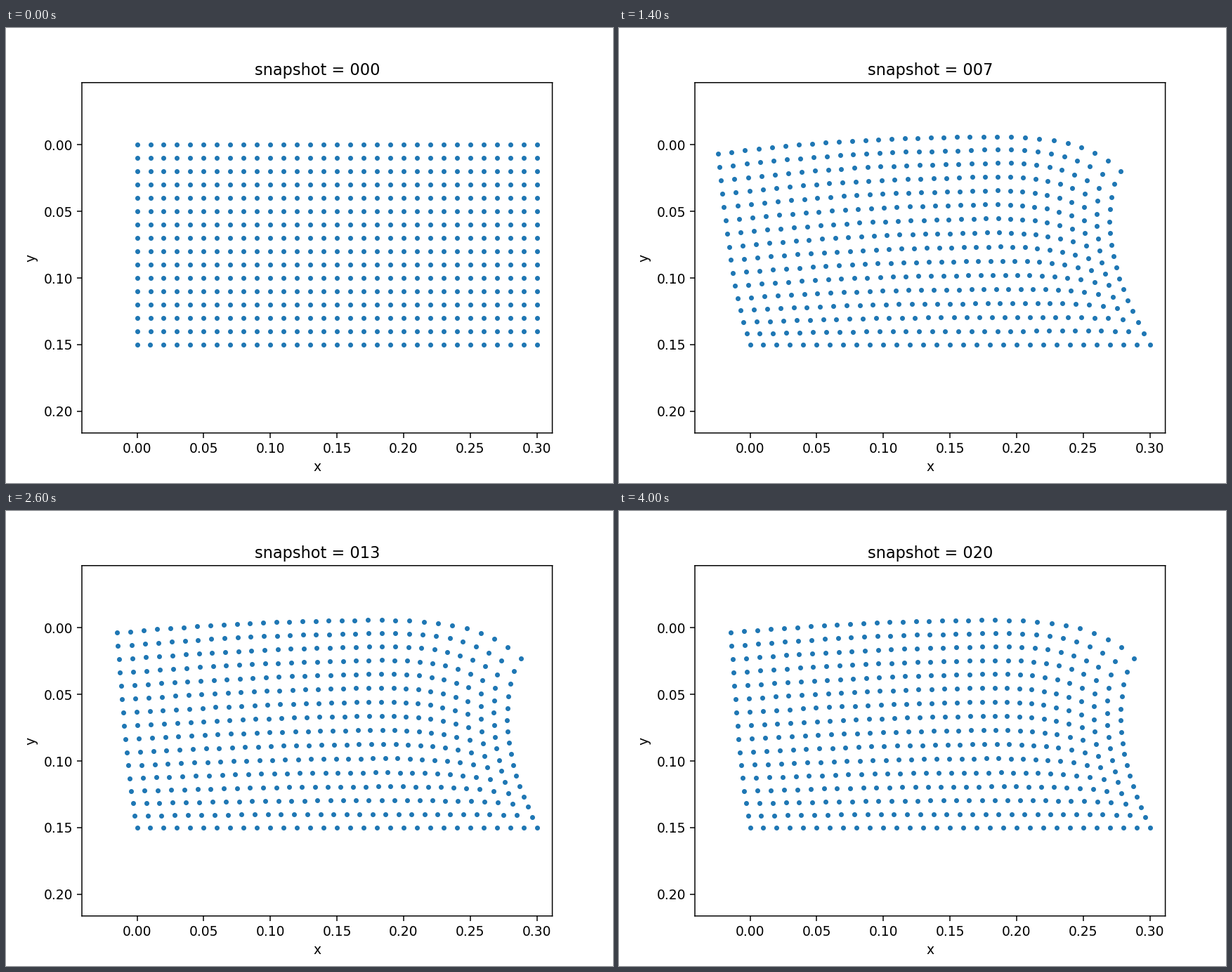
A matplotlib script that plays this animation: 864 by 648 pixels, repeating every 4.2 s.

```python
import itertools
import numpy as np
import matplotlib.pyplot as plt
from matplotlib.animation import FuncAnimation

PX_PER_UNIT = 1897.0
COLS, ROWS = 31, 16
FRAMES, INTERVAL = 21, 200
LAME, SHEAR = 6.0, 1.0  # nearly incompressible block

col, row = np.meshgrid(np.arange(COLS), np.arange(ROWS))
x0, y0 = col * 0.01, row * 0.01


def smoothstep(u):
    u = np.clip(u, 0, 1)
    return u * u * (3 - 2 * u)


def element_stiffness():
    """Stiffness of a unit square bilinear element in plane strain."""
    elastic = np.array([[LAME + 2 * SHEAR, LAME, 0],
                        [LAME, LAME + 2 * SHEAR, 0],
                        [0, 0, SHEAR]])
    stiffness = np.zeros((8, 8))
    gauss = 0.5 + np.array([-0.5, 0.5]) / np.sqrt(3)
    for s, t in itertools.product(gauss, gauss):
        d_ds = np.array([t - 1, 1 - t, t, -t])
        d_dt = np.array([s - 1, -s, s, 1 - s])
        strain = np.zeros((3, 8))
        strain[0, 0::2] = strain[2, 1::2] = d_ds
        strain[1, 1::2] = strain[2, 0::2] = d_dt
        stiffness += strain.T @ elastic @ strain / 4
    return stiffness


def relax_interior(field, edge):
    """Elastic equilibrium of the inner nodes for given edge displacements."""
    total = np.zeros((field.size, field.size))
    local = element_stiffness()
    for j, i in itertools.product(range(ROWS - 1), range(COLS - 1)):
        a = j * COLS + i
        nodes = np.array([a, a + 1, a + COLS + 1, a + COLS])
        dofs = np.column_stack([2 * nodes, 2 * nodes + 1]).ravel()
        total[np.ix_(dofs, dofs)] += local
    values = field.ravel().copy()
    fixed = np.repeat(edge.ravel(), 2)
    inner = ~fixed
    values[inner] = np.linalg.solve(total[np.ix_(inner, inner)],
                                    -total[np.ix_(inner, fixed)] @ values[fixed])
    return values.reshape(field.shape)


def load_mode():
    """Pressed block: the top swells, the right side sinks and caves in."""
    field = np.zeros((ROWS, COLS, 2))
    t, v = np.linspace(0, 1, COLS), np.linspace(0, 1, ROWS)
    field[:, 0] = np.column_stack([np.sin(np.pi * v), -2.4 * (1 - v ** 2)])
    field[:, -1] = np.column_stack([
        7.2 * np.exp(-15 * v) - 19.2 * np.sin(np.pi * v ** 0.8),
        52.6 * (1 - v ** 1.9)])
    field[0] = np.column_stack([
        16.6 * smoothstep((t - 0.6) / 0.4) - 9.5 * t,
        70 * t ** 8.3 - 15 * t - 2.4])
    field[-1] = 0
    edge = (row == 0) | (row == ROWS - 1) | (col == 0) | (col == COLS - 1)
    return relax_interior(field, edge)


def sway_mode():
    """Shear to the left with both ends tilting; the bottom is clamped."""
    c, v = (col - 15) / 15, row / 15
    dx = -(0.9 + 0.03 * c + 0.13 * c ** 2) * (1 - 0.6 * v - 0.4 * v ** 3)
    dy = -0.33 * c * np.abs(c) * (1 - v ** 4)
    return np.dstack([dx, dy])


def load_level(n):
    return 1 - np.exp(-0.8 * n) * np.cos(0.75 * n)


def sway_level(n):
    """Damped swing about 30 px with a soft start."""
    swing = 31.17 * np.exp(-0.064 * n) * np.sin(np.pi / 8 * (n - 4.7))
    return 30 + swing - 3 * np.exp(-((n - 3) / 1.3) ** 2)


REST = np.dstack([x0, y0])
LOADED, SWAYED = load_mode(), sway_mode()


def positions(n):
    shift = load_level(n) * LOADED + sway_level(n) * SWAYED
    return (REST + shift / PX_PER_UNIT).reshape(-1, 2)


plt.rcParams["font.family"] = "DejaVu Sans"
fig, ax = plt.subplots(figsize=(6.4, 4.8), dpi=135)
dots = ax.scatter(x0.ravel(), y0.ravel(), s=5, color="C0", linewidths=1.5)
ax.set_xlim(-0.0414, 0.3116)
ax.set_ylim(0.2163, -0.0467)
ax.set_xticks(np.arange(7) * 0.05)
ax.set_yticks(np.arange(5) * 0.05)
ax.set_xlabel("x")
ax.set_ylabel("y")
title = ax.set_title("snapshot = 000")
for spine in ax.spines.values():
    spine.set_snap(False)


def update(n):
    dots.set_offsets(positions(n))
    title.set_text(f"snapshot = {n:03d}")
    return dots, title


anim = FuncAnimation(fig, update, frames=FRAMES, interval=INTERVAL, repeat=True)
plt.show()
```
